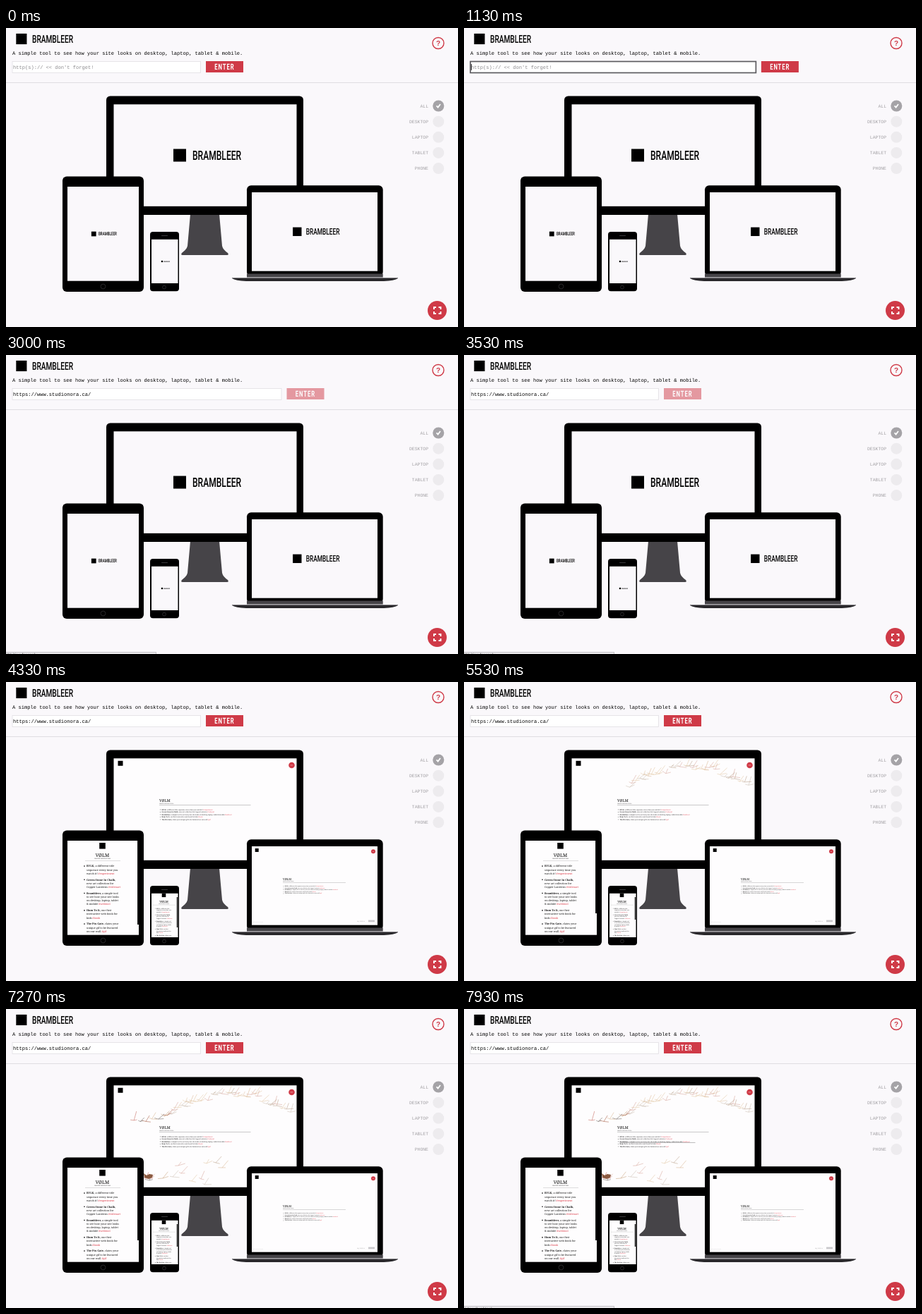
Write an HTML page that moves like this. It is 640x424 px and loops after 8000 ms.

```html
<!DOCTYPE html>
<html lang="en">
<head>
<meta charset="utf-8">
<title>Device preview</title>
<style>
  html, body { margin: 0; width: 100%; height: 100%; overflow: hidden; background: #faf8fb; }
  svg { display: block; width: 640px; height: 424px; }
  text { white-space: pre; text-rendering: geometricPrecision; }
  .mono { font-family: "Liberation Mono", monospace; }
  .serif { font-family: "Noto Serif", serif; }
  .head { font-family: Roboto, "Liberation Sans", sans-serif; font-weight: 500; }
  .bar { font-family: "Liberation Sans", sans-serif; }
</style>
</head>
<body>
<svg id="stage" viewBox="0 0 640 424"></svg>
<script>
const LOOP = 8000;
const RED = '#cf3a47', INK = '#000', PAPER = '#faf8fb', STEEL = '#464448';
const NS = 'http://www.w3.org/2000/svg';
const stage = document.getElementById('stage');

function add(parent, tag, attrs = {}, content) {
  const el = document.createElementNS(NS, tag);
  for (const k in attrs) el.setAttribute(k, attrs[k]);
  if (content !== undefined) el.textContent = content;
  parent.append(el);
  return el;
}
const group = (parent, transform = '') => add(parent, 'g', { transform });
const box = (parent, x, y, x2, y2, fill, rx = 0) =>
  add(parent, 'rect', { x, y, width: x2 - x, height: y2 - y, fill, rx });
const disc = (parent, cx, cy, r, fill) => add(parent, 'circle', { cx, cy, r, fill });
const path = (parent, d, attrs) => add(parent, 'path', { d, ...attrs });
const label = (parent, cls, x, y, size, fill, str, more = {}) =>
  add(parent, 'text', { class: cls, x, y, 'font-size': size, fill, ...more }, str);
const show = (el, on) => el.setAttribute('visibility', on ? 'visible' : 'hidden');
const ramp = (t, from, to) => Math.min(1, Math.max(0, (t - from) / (to - from)));
const ease = p => p * p * (3 - 2 * p);

// Wordmark in condensed capitals, centred on y, with its mark to the left
function wordmark(parent, x, y, s) {
  const g = group(parent, `translate(${x} ${y}) scale(${s})`);
  box(g, -27, -9, -9, 9, INK);
  label(group(g, 'scale(.66 1)'), 'head', 0, 6.6, 18.3, INK, 'BRAMBLEER');
}

// ---- header ----
box(stage, 0, 0, 640, 424, PAPER);
box(stage, 0, 77, 640, 78, '#e0dee2');
wordmark(stage, 37, 15.5, .84);
label(stage, 'mono', 9, 38, 7.07, INK,
  'A simple tool to see how your site looks on desktop, laptop, tablet & mobile.');

const field = add(stage, 'rect', { x: 9, y: 47.5, height: 16, fill: '#fff' });
const hint = label(stage, 'mono', 10, 58, 7.07, '#8c8b8e', "http(s):// << don't forget!");
const url = label(stage, 'mono', 10, 58, 7.07, INK, 'https://www.studionora.ca/');
const caret = box(stage, 0, 51, .7, 60, INK);

const enter = group(stage);
box(enter, 0, 47, 53, 63, RED);
label(group(enter, 'translate(12.3 59) scale(.66 1)'), 'head', 0, 0, 11.6, '#fff', 'ENTER',
  { 'letter-spacing': 1.4, style: 'font-weight:700' });

// ---- side controls ----
add(stage, 'circle', { cx: 612, cy: 21.5, r: 8, fill: 'none', stroke: RED, 'stroke-width': 1.4 });
label(stage, 'bar', 612, 25, 10, RED, '?', { 'text-anchor': 'middle', 'font-weight': 700 });
['ALL', 'DESKTOP', 'LAPTOP', 'TABLET', 'PHONE'].forEach((name, i) => {
  const y = 110.5 + i * 22.15;
  label(stage, 'mono', 598, y + 2.2, 6.45, '#a3a1a5', name, { 'text-anchor': 'end' });
  disc(stage, 612.3, y, 8, i ? '#edebee' : '#a5a3a7');
});
path(stage, 'M609.6 110.4l2 2.2 3.4-4.6', { fill: 'none', stroke: '#fff', 'stroke-width': 1.8 });
disc(stage, 610.5, 400.5, 13.5, RED);
path(stage, 'M606 399v-3h3M612.5 396h3v3M615.5 402v3h-3M609 405h-3v-3',
  { fill: 'none', stroke: '#fff', 'stroke-width': 1.9 });

// ---- devices ----
path(stage, 'M261 264H302L306 309Q307 314 314 319Q316 322 313 322H250Q247 322 249 319Q256 314 257 309Z',
  { fill: STEEL });

function device(outer, r, screen) {
  box(stage, ...outer, INK, r);
  const face = box(stage, ...screen, PAPER);
  const idle = group(stage), site = group(stage);
  const id = 'clip' + stage.children.length;
  box(add(stage, 'clipPath', { id }), ...screen, INK);
  site.setAttribute('clip-path', `url(#${id})`);
  return { face, idle, site };
}
const ring = (cx, cy, r) =>
  add(stage, 'circle', { cx, cy, r, fill: 'none', stroke: '#3a393c', 'stroke-width': .7 });

const desktop = device([142, 96.5, 421, 265], 5.5, [152.5, 108.3, 411.5, 252.8]);
const tablet = device([80, 210.5, 195, 374], 6, [87, 225, 188, 358.7]);
ring(137.5, 366.5, 3.4);
const phone = device([204, 289, 245, 373.3], 4, [206, 299.8, 243.5, 362]);
ring(224, 367.6, 2.4);
box(stage, 220, 294, 229, 295, '#3a393c', .5);
const laptop = device([341, 223.3, 533.7, 352], 6, [348, 233, 526, 344.7]);
box(stage, 341, 348.5, 533.7, 353.5, STEEL);
path(stage, 'M320 355H555Q550 358.5 535 359H340Q325 358.5 320 355Z', { fill: '#29282b' });
path(stage, 'M320 354.5H555', { stroke: '#5a585c', 'stroke-width': .8 });

wordmark(desktop.idle, 264, 180.5, 1);
wordmark(laptop.idle, 424.7, 288.8, .69);
wordmark(tablet.idle, 131, 292, .375);
wordmark(phone.idle, 223.2, 331, .125);

// ---- previewed page ----
const STUDIO = 'VØLM', TAGLINE = 'CREATIVE DESIGN STUDIO', TAG = '#dc3f4c';
const works = [
  ['RVLK', 'a different title|sequence every time you|watch it!', '#experiment'],
  ['Green Stone In Chalk', '|new art collection for|Copper Lanterns', '#videoart'],
  ['Brambleer', 'a simple tool|to see how your site looks|on desktop, laptop, tablet|& mobile', '#webtool'],
  ['Hum To It', 'our first|interactive web book for|kids', '#book'],
  ['The Pix Gate', 'claim your|unique gif to be featured|on our wall', '#gif'],
];
const bold = (el, name) => add(el, 'tspan', { 'font-weight': 700 }, name + ',');
const hashtag = (el, tag) => add(el, 'tspan', { fill: TAG }, ' ' + tag);

function widePage(parent, x, y, s, ruleEnd) {
  const g = group(parent, `translate(${x} ${y}) scale(${s})`);
  label(g, 'serif', 0, 0, 5.3, INK, STUDIO, { 'font-weight': 500 });
  label(g, 'serif', 0, 2.9, 1.6, '#333', TAGLINE);
  box(g, 0, 4.5, ruleEnd, 4.9, '#777');
  works.forEach(([name, copy, tag], i) => {
    const ly = 11.7 + i * 3.47;
    disc(g, 1.3, ly - .7, .45, INK);
    const line = label(g, 'serif', 3.6, ly, 2.17, '#222');
    bold(line, name);
    add(line, 'tspan', {}, ' ' + copy.split('|').filter(Boolean).join(' '));
    hashtag(line, tag);
  });
  return g;
}

function narrowHead(parent, x, y, s) {
  const g = group(parent, `translate(${x} ${y}) scale(${s})`);
  const mid = { 'text-anchor': 'middle' };
  box(g, -4.3, -20, 4.3, -11.4, INK);
  label(g, 'serif', 0, 0, 6.6, INK, STUDIO, { ...mid, 'font-weight': 500 });
  label(g, 'serif', 0, 3.2, 1.8, '#222', TAGLINE, mid);
  box(g, -24.5, 5.3, 25.5, 5.7, '#aaa');
}

function narrowList(parent, x, y, s) {
  const g = group(parent, `translate(${x} ${y}) scale(${s})`);
  let ly = 0;
  for (const [name, copy, tag] of works) {
    disc(g, 0, ly - 1.3, .8, INK);
    const rows = copy.split('|');
    rows.forEach((row, i) => {
      const line = label(g, 'serif', 3, ly, 3.75, '#1c1c1c');
      if (!i) bold(line, name);
      add(line, 'tspan', {}, (i ? '' : ' ') + row);
      if (i === rows.length - 1) hashtag(line, tag);
      ly += 5.2;
    });
    ly += 3.6;
  }
}

const art = group(desktop.site);
box(desktop.site, 158.5, 111.8, 165.5, 118.8, INK);
disc(desktop.site, 404.5, 118, 4.3, RED);
box(desktop.site, 402.7, 117.6, 406.3, 118.4, '#e9a0a6');
const page = widePage(desktop.site, 217, 170, 1, 129.5);
const underline = box(page, 3.6, 19, 110.5, 19.3, '#222');

box(laptop.site, 352.7, 236, 357.7, 241, INK);
disc(laptop.site, 520, 240.3, 3, RED);
box(laptop.site, 518.8, 240, 521.2, 240.6, '#e9a0a6');
widePage(laptop.site, 392, 281, .76, 117);
label(laptop.site, 'bar', 350, 341, 2, '#dcdadd', 'all works shown');
label(laptop.site, 'bar', 497, 340, 2.2, '#aaa', 'say hello or');
box(laptop.site, 513, 337.6, 522, 340.3, '#c9c8cb');

narrowHead(tablet.site, 136.5, 248, 1);
narrowList(tablet.site, 111, 262.4, 1);
const tabletThumb = box(tablet.site, 186, 225, 188, 226, '#111');
narrowHead(phone.site, 223.5, 312.5, .65);
narrowList(phone.site, 211.5, 321.7, .47);
const phoneThumb = box(phone.site, 241.8, 305, 243.5, 306, '#111');

// ---- twig drawing on the desktop page ----
let seed = 11;
const rnd = (lo, hi) => {
  seed = (seed * 16807) % 2147483647;
  return lo + (hi - lo) * seed / 2147483647;
};
const trail = [[405, 146], [384, 136], [366, 132], [352, 121], [332, 123], [318, 118], [296, 121],
  [272, 133], [256, 131], [244, 141], [231, 152], [208, 156], [180, 158]];
const lower = [[198, 240], [206, 239], [222, 240], [236, 238], [244, 222], [248, 233], [263, 244],
  [276, 241], [284, 219], [297, 218], [306, 225], [281, 249], [203, 243]];
const tints = ['#d9b48f', '#cbbfb2', '#e2c6a4', '#b9a08a', '#d6a59a'];
const strong = ['#a4573f', '#6b625c', '#d08a5c', '#c46a5e', '#c9a27c'];
const twigs = [];

function twig(x, y, at) {
  const dark = x < 232 && rnd(0, 1) < .75;
  const ink = (dark ? strong : tints)[Math.floor(rnd(0, 5))];
  const arm = (deg, len) => {
    const a = deg * Math.PI / 180;
    return `M${x} ${y}l${Math.cos(a) * len} ${Math.sin(a) * len}`;
  };
  const d = arm(rnd(-75, -40), rnd(6, 14)) + arm(rnd(-30, 15), rnd(4, 11)) + arm(rnd(175, 215), rnd(3, 7));
  twigs.push([path(art, d, { fill: 'none', stroke: ink, 'stroke-width': .55 }), at]);
}
const along = (pts, p) => {
  const f = p * (pts.length - 1), i = Math.min(pts.length - 2, Math.floor(f));
  return [0, 1].map(k => pts[i][k] + (pts[i + 1][k] - pts[i][k]) * (f - i));
};
for (let i = 0; i < 38; i++) {
  const [x, y] = along(trail, i / 37);
  twig(x + rnd(-2, 2), y + rnd(-2, 3), 4450 + i * 36);
}
lower.forEach(([x, y], i) => twig(x, y, 5850 + i * 50));
const nest = path(art, 'M195 233l4 3 4-2 5 1-1 4-5 2-6-2z', { fill: '#8b5a40' });

// ---- status bar ----
const status = group(stage);
add(status, 'rect', { x: -1, y: 421.5, width: 213.5, height: 6, fill: '#eceaed', stroke: '#bbb9bd', 'stroke-width': .8 });
const waiting = label(status, 'bar', 1, 427.2, 6, '#444', 'Waiting for reply');
const linkText = label(status, 'bar', 1, 427.2, 6, '#666', 'https://webtool');

// ---- timeline ----
const between = (t, a, b) => t >= a && t < b;

function draw(t) {
  const wide = ease(ramp(t, 595, 1395)) - ease(ramp(t, 2665, 3465));
  const focus = between(t, 595, 2665);
  const typed = t >= 1930;
  field.setAttribute('width', 266.5 + 185 * wide);
  field.setAttribute('stroke', focus ? '#5d5c60' : '#e4e2e6');
  field.setAttribute('stroke-width', focus ? 1.7 : .9);
  enter.setAttribute('transform', `translate(${283 + 185 * wide} 0)`);
  enter.setAttribute('opacity', 1 - .5 * (ramp(t, 2665, 2865) - ramp(t, 3960, 4160)));
  show(hint, !typed);
  show(url, typed);
  caret.setAttribute('x', typed ? 120 : 10);
  show(caret, between(t, 1100, 1600) || between(t, 1930, 2400));

  const loading = between(t, 2700, 4200), hover = t >= 7600;
  show(status, loading || hover);
  show(waiting, loading);
  show(linkText, hover);
  show(underline, hover && t >= 3730);

  [[desktop, 3730], [laptop, 3800], [tablet, 3930], [phone, 4000]].forEach(([d, at]) => {
    d.face.setAttribute('fill', t >= 3600 ? '#fefdfe' : PAPER);
    d.idle.setAttribute('display', t < 3600 ? 'inline' : 'none');
    d.site.setAttribute('display', t >= at ? 'inline' : 'none');
  });
  const grown = t >= 4700;
  tabletThumb.setAttribute('height', grown ? 103 : 119);
  phoneThumb.setAttribute('height', grown ? 32 : 43);

  for (const [el, at] of twigs) show(el, t >= at);
  show(nest, t >= 7000);
}

const start = performance.now();
function tick() {
  draw((performance.now() - start) % LOOP);
  requestAnimationFrame(tick);
}
tick();
</script>
</body>
</html>
```
